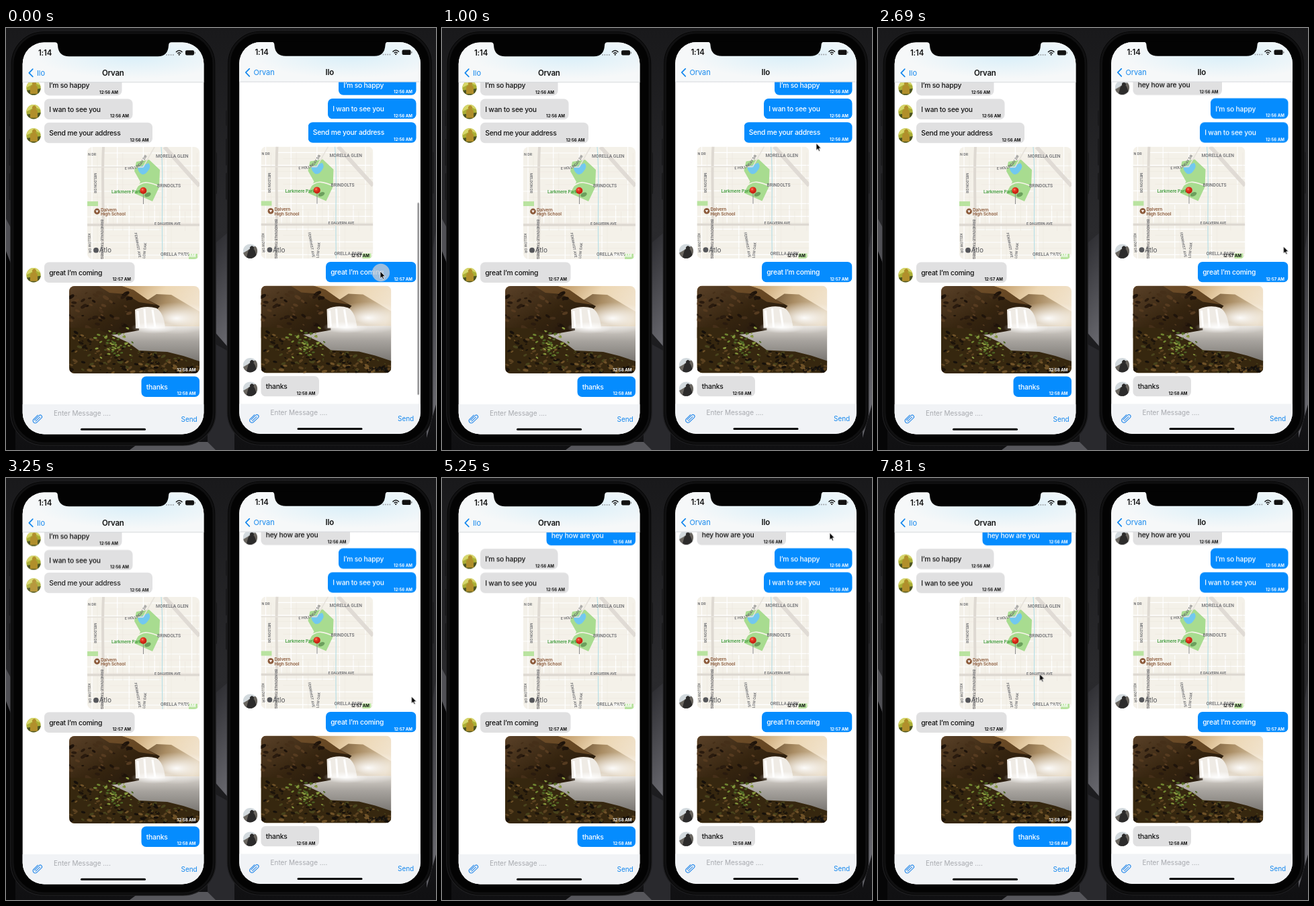
An HTML page that plays this animation: 640x628 px, repeating every 8 s.

```html
<!DOCTYPE html>
<html lang="en">
<head>
<meta charset="utf-8">
<title>Chat</title>
<style>
html, body { margin: 0; width: 100%; height: 100%; overflow: hidden; background: #0c0c0e; }
svg { display: block; width: 100vw; height: 100vh; font-family: Inter, "Open Sans", sans-serif; }
.msg { font-size: 10.3px; font-weight: 500; letter-spacing: -.2px; }
.time { font-size: 6.1px; font-weight: 700; text-anchor: end; }
.title { font-size: 11.4px; font-weight: 600; letter-spacing: -.2px; }
.link { font-size: 11px; fill: #1588ee; letter-spacing: -.1px; }
.hint { font-size: 10px; fill: #a7a9ae; }
.label { font: 500 6.7px Roboto, sans-serif; fill: #6d6e72; }
.road { font: 500 5.4px Roboto, sans-serif; fill: #66676b; }
.place { font: 600 6.6px Inter, sans-serif; letter-spacing: -.15px; }

.cursor, .tap, .bar, .upper, .gone { animation: 8s ease-in-out infinite; }
.cursor { animation-name: cursor; }
.tap { animation-name: tap; }
.bar { animation-name: bar; }
.right .upper { animation-name: drop-right; }
.right .gone { animation-name: swipe; }
.left .upper { animation-name: drop-left; }
.left .gone { animation-name: fade; }

@keyframes cursor {
  0%, 3% { transform: translate(557px, 362px); }
  11.8%, 14.1% { transform: translate(557px, 171.5px); }
  17.5%, 18.2% { transform: translate(508px, 168px); }
  21.6%, 26.8% { transform: translate(576.5px, 161.5px); }
  33.4%, 57% { transform: translate(603.5px, 325px); }
  59.4%, 81.25% { transform: translate(577px, 81.5px); }
  89.9%, 93.75% { transform: translate(268px, 236px); }
  97.4%, 100% { transform: translate(240.5px, 291.5px); }
}
@keyframes tap {
  0%, .75% { opacity: 1; }
  2.3%, 14.1% { opacity: 0; }
  14.8%, 17.6% { opacity: 1; }
  18.4%, 22.7% { opacity: 0; }
  23.3%, 24.3% { opacity: 1; }
  25.2%, 100% { opacity: 0; }
}
@keyframes bar {
  0%, 5% { opacity: 1; }
  9%, 100% { opacity: 0; }
}
@keyframes drop-right {
  0%, 25% { transform: none; }
  29.8%, 100% { transform: translateY(35.3px); }
}
@keyframes drop-left {
  0%, 39.9% { transform: none; }
  45%, 100% { transform: translateY(35.3px); }
}
@keyframes swipe {
  0%, 14.6% { transform: none; opacity: 1; }
  18.6%, 25% { transform: translateX(-49px); opacity: 1; }
  28.5%, 100% { transform: translateX(-120px); opacity: 0; }
}
@keyframes fade {
  0%, 39.9% { opacity: 1; }
  43.5%, 100% { opacity: 0; }
}
</style>
</head>
<body>
<svg id="stage" viewBox="0 0 640 628" preserveAspectRatio="none">
  <defs>
    <linearGradient id="bg" x2="0" y2="1">
      <stop stop-color="#19191b"/><stop offset=".48" stop-color="#2a2a2d"/><stop offset="1" stop-color="#101012"/>
    </linearGradient>
    <linearGradient id="facet" x2=".3" y2="1">
      <stop stop-color="#222226"/><stop offset="1" stop-color="#66666c"/>
    </linearGradient>
    <linearGradient id="sky" x1="0" x2="1" y2=".5">
      <stop offset=".35" stop-color="#c09a67"/><stop offset=".6" stop-color="#ecd6b2"/><stop offset="1" stop-color="#f3e9da"/>
    </linearGradient>
    <linearGradient id="hill" x2="1" y2=".3">
      <stop stop-color="#6e5435"/><stop offset=".4" stop-color="#a98c63"/><stop offset="1" stop-color="#dfcdb0"/>
    </linearGradient>
    <linearGradient id="lake" x2="0" y2="1">
      <stop stop-color="#d9d4cd"/><stop offset=".4" stop-color="#a7a39e"/><stop offset="1" stop-color="#76736f"/>
    </linearGradient>
    <linearGradient id="cliff" x2="1" y2="1">
      <stop stop-color="#5a4128"/><stop offset=".5" stop-color="#35240f"/><stop offset="1" stop-color="#1f150c"/>
    </linearGradient>
    <radialGradient id="mist"><stop stop-color="#fff" stop-opacity=".95"/><stop offset="1" stop-color="#fff" stop-opacity="0"/></radialGradient>
    <radialGradient id="tint" cx=".62" cy=".35" r=".55">
      <stop stop-color="#d9eff9"/><stop offset="1" stop-color="#f6f8f9"/>
    </radialGradient>
    <radialGradient id="ball" cx=".38" cy=".35"><stop stop-color="#ff8a74"/><stop offset=".4" stop-color="#ec3a24"/><stop offset="1" stop-color="#c62313"/></radialGradient>
    <clipPath id="screen"><rect x="24.700" y="21.500" width="269.700" height="583" rx="32"/></clipPath>
    <clipPath id="chat"><rect x="24" y="81" width="271" height="479"/></clipPath>
    <clipPath id="mapBox"><rect x="121" y="177" width="167" height="167" rx="8"/></clipPath>
    <clipPath id="photoBox"><rect width="194" height="130" rx="8"/></clipPath>
    <clipPath id="face"><circle r="10.700"/></clipPath>
    <path id="bend" d="M177 211L190 210Q199 208 204 200L217 180"/>

    <g id="map" clip-path="url(#mapBox)">
      <rect x="121" y="177" width="167" height="167" fill="#f4f1e9"/>
      <g id="streets" stroke="#fff" stroke-width="1.200" fill="none"></g>
      <path d="M121 258h16v7h-16zM272 336h13v8h-13z" fill="#b9e3a0"/>
      <path d="M194 199L213 196L229 211L228 237L218 258L191 246L200 229L191 213Z" fill="#a8dc90"/>
      <path d="M190 240Q201 229 210 230T229 236" stroke="#f6f3e8" stroke-width="1.600" fill="none"/>
      <path d="M196 208Q203 205 212 201Q217 206 211 213Q206 220 201 217Q196 213 196 208Z" fill="#72c8ef"/>
      <path d="M231 177C235 220 231 260 233 344" stroke="#b8dfe6" stroke-width="1.200" fill="none"/>
      <g fill="none" stroke="#ded9d2">
        <path d="M145 177C142 230 147 280 143 344" stroke-width="4"/>
        <path d="M121 293H288" stroke-width="3.500"/>
        <path d="M236 177Q266 211 288 235" stroke-width="6" stroke="#e0dbd5"/>
        <path d="M121 207H204M204 207L221 177" stroke-width="1.600" stroke="#e6e2db"/>
      </g>
      <g class="road">
        <text x="122" y="190">N DR</text>
        <text><textPath href="#bend">E HOLLINGAY DR</textPath></text>
        <text x="221" y="293">E DALVERN AVE</text>
        <text transform="translate(131 216)rotate(90)">MELDON DR</text>
        <text transform="translate(141 285)rotate(90)">BRINDOVALE-TAMOREG</text>
        <text transform="translate(191 305)rotate(80)">FENWHIST AVE</text>
        <text transform="translate(207 343)rotate(-84)">LOW OAK</text>
        <text transform="translate(122 306)rotate(88)">KELLOW DR</text>
      </g>
      <g class="label">
        <text x="223" y="192.500">MORELLA GLEN</text>
        <text x="225" y="236.500">BRINDOLTS</text>
        <text x="230" y="339">ORELLA PARK</text>
      </g>
      <g class="place">
        <text x="157" y="246" fill="#3f9a3a">Larkmere Park</text>
        <g fill="#8c5b3c"><circle cx="135.500" cy="273" r="4.400"/><text x="141" y="272.800">Dalvern</text><text x="141" y="279.300">High School</text></g>
      </g>
      <path d="M133.300 271.500h4.400l-2.200 3.500z" fill="#fff"/>
      <ellipse cx="211" cy="248" rx="5" ry="3" fill="#3d6d34" opacity=".55" transform="rotate(-25 211 248)"/>
      <path d="M204.500 246V262" stroke="#8f8f8f" stroke-width="1.100"/>
      <circle cx="204.300" cy="242" r="5" fill="url(#ball)"/>
      <circle cx="134" cy="330.700" r="3.900" fill="#55565a"/>
      <text x="138.500" y="334.300" font-size="10" fill="#55565a">Atlo</text>
    </g>

    <g id="photo" clip-path="url(#photoBox)">
      <rect width="194" height="130" fill="url(#sky)"/>
      <path d="M112 24L130 12L152 13L194 38V78H112Z" fill="url(#hill)"/>
      <rect y="60" width="194" height="55" fill="url(#lake)"/>
      <ellipse cx="160" cy="48" rx="58" ry="24" fill="url(#mist)"/>
      <path d="M0 0H78L96 6L116 20L135 30L128 38L102 36L104 66L70 72L0 78Z" fill="url(#cliff)"/>
      <path d="M44 0H78L96 6L116 20L130 28L104 24L84 12L60 10Z" fill="#80592f" opacity=".65"/>
      <g id="rock"></g>
      <path d="M98 35Q114 28 130 33Q141 40 143 63H99Z" fill="#efebe5"/>
      <path d="M102 37L104 61M112 34L114 62M124 35L128 61" stroke="#fff" stroke-width="3"/>
      <ellipse cx="126" cy="62" rx="34" ry="9" fill="url(#mist)"/>
      <path d="M0 62L40 63L66 74L88 84L104 96L146 98L170 104L194 112V130H0Z" fill="#36270f"/>
      <g id="moss"></g>
    </g>

    <g id="faceA" clip-path="url(#face)">
      <rect x="-11" y="-11" width="22" height="22" fill="#a9ae35"/>
      <path d="M-11-11H11V-3L2-7L-11 0Z" fill="#d6d66a"/><path d="M-11 4L11 1V11H-11Z" fill="#4d5423"/>
      <path d="M-5 9V0Q-4-4-1-4A3 3 0 1 1 3-4Q6-3 6 1V9Z" fill="#b18f2b"/>
    </g>
    <g id="faceB" clip-path="url(#face)">
      <rect x="-11" y="-11" width="22" height="22" fill="#d3dade"/>
      <path d="M-11 3L-4-1L3-6L11-8V11H-11Z" fill="#6a6660"/>
      <path d="M-6 11L-3 0Q-2-3 0-3A3 3 0 1 1 5-3Q8-1 10 11Z" fill="#2c2b2b"/>
    </g>
    <path id="clip" d="M-4.500 1.500L2.200-5.200A2.500 2.500 0 0 1 5.800-1.600L-1.800 5.600A3.500 3.500 0 0 1-6.300.600L.300-5.800M-2.800 3.200L3.500-2.800" fill="none" stroke="#2a8bea" stroke-width="1.100" stroke-linecap="round"/>
    <path id="trash" d="M-6-4.500H6M-2-4.500V-6.500H2V-4.500M-4.800-4.500L-4 7H4L4.800-4.500M-1.900-2V4.500M0-2V4.500M1.900-2V4.500" fill="none" stroke="#fff" stroke-width=".9" stroke-linejoin="round"/>
  </defs>

  <rect width="640" height="628" fill="url(#bg)"/>
  <path d="M300 330L340 296V486L300 440Z" fill="url(#facet)"/>
  <path d="M300 464L340 486V628H300Z" fill="#29292d"/>
  <path d="M626 380L640 300V560L626 610Z" fill="url(#facet)"/>
  <path d="M0 330L14 370V628H0Z" fill="#060607"/>
  <path d="M0 284L14 310V368L0 332Z" fill="#505055"/>
  <path d="M184 628L200 616H300L312 628Z" fill="#56565b"/>
  <g id="phones"></g>
  <g class="cursor">
    <circle class="tap" cx="1" cy="2" r="13.200" fill="#c3cad6" fill-opacity=".8"/>
    <path d="M0 0V10.600L2.400 8.400L4 12L5.700 11.200L4.100 7.800H7.400Z" fill="#000" stroke="#fff" stroke-width=".8" stroke-linejoin="round"/>
  </g>
</svg>
<script>
const $ = id => document.getElementById(id);
const RIGHT = 288, LEFT = 57, H = 30.5;

let seed = 7;
const rnd = () => (seed = seed * 16807 % 2147483647) / 2147483647;

const text = (x, y, s, cls, fill = '#111') =>
  `<text x="${x}" y="${y}" class="${cls}" fill="${fill}">${s}</text>`;

// top: y of the row's bubble, by: who sent it
const row = (top, by, w, msg, time) => ({ top, by, w, msg, time, h: H });
const upper = [
  row(34.6, 'B', 132.5, 'hey how are you', '12:56 AM'),
  row(69.9, 'A', 115.5, 'I’m so happy', '12:56 AM'),
  row(105.5, 'A', 131.5, 'I wan to see you', '12:56 AM')
];
const gone = row(140.8, 'A', 161, 'Send me your address', '12:56 AM');
const lower = [
  { top: 177, by: 'B', w: 167, h: 167, art: 'map', time: '12:57 AM' },
  row(348.5, 'A', 134.5, 'great I’m coming', '12:57 AM'),
  { top: 384, by: 'B', w: 194, h: 129.7, art: 'photo', time: '12:58 AM' },
  row(518.5, 'B', 86.5, 'thanks', '12:58 AM')
];

function drawRow(r, me) {
  const mine = r.by === me, x = mine ? RIGHT - r.w : LEFT, bottom = r.top + r.h;
  let out = mine ? '' : `<use href="#face${r.by}" x="41" y="${bottom - 11.3}"/>`;
  if (r.art === 'map') out += `<use href="#map" x="${x - 121}"/>`;
  else if (r.art) out += `<use href="#photo" x="${x}" y="${r.top}"/>`;
  else out += `<rect x="${x}" y="${r.top}" width="${r.w}" height="${r.h}" rx="7" fill="${mine ? '#058cfe' : '#e0e0e1'}"/>`
    + text(x + 7.2, r.top + 19.3, r.msg, 'msg', mine ? '#fff' : '#111');
  return out + text(x + r.w - 5.5, bottom - 2.8, r.time, 'time', mine ? '#fff' : '#111');
}

function header(back, title) {
  return `<rect x="24" y="21" width="271" height="60" fill="url(#tint)"/>
    <path d="M24 80.700H295" stroke="#c9cccf" stroke-width=".7"/>
    ${text(48, 41, '1:14', 'title')}
    <g fill="#9fa3a8">${[0, 1, 2, 3].map(i => `<circle cx="${239 + i * 3.3}" cy="40" r="1"/>`).join('')}</g>
    <path d="M253 36Q257.700 31 262.400 36M255.200 38Q257.700 35.300 260.200 38" fill="none" stroke="#111" stroke-width="1.500"/>
    <circle cx="257.700" cy="39.700" r="1.100" fill="#111"/>
    <rect x="267" y="33.200" width="13" height="7.300" rx="2" fill="#111"/><rect x="280.700" y="35.500" width="1.200" height="2.800" rx=".6" fill="#777"/>
    <path d="M39.800 61.200L34.300 66.800L39.800 72.400" fill="none" stroke="#1588ee" stroke-width="1.700" stroke-linecap="round" stroke-linejoin="round"/>
    <text x="46" y="70.500" class="link">${back}</text>
    <text x="159.300" y="70.500" class="title" fill="#111" text-anchor="middle">${title}</text>`;
}

const footer = `<rect x="24" y="560" width="271" height="45" fill="#f1f3f6"/>
  <use href="#clip" x="47" y="582"/>
  <text x="71" y="577" class="hint">Enter Message ....</text>
  <text x="284.500" y="586" class="link" style="font-size:10px" text-anchor="end">Send</text>
  <rect x="111" y="595.700" width="97" height="3" rx="1.500" fill="#000"/>`;

const body = `<g fill="#18181a">
    <rect x="4.500" y="123" width="4" height="23" rx="1.500"/><rect x="4.500" y="165" width="4" height="40" rx="1.500"/>
    <rect x="4.500" y="216" width="4" height="40" rx="1.500"/><rect x="310" y="185" width="4" height="62" rx="1.500"/>
  </g>
  <rect x="7" y="4.500" width="305" height="616.500" rx="49" fill="#030303" stroke="#1c1c1e" stroke-width="1.500"/>
  <rect x="10" y="7.500" width="299" height="610.500" rx="46" fill="none" stroke="#101011" stroke-width="3"/>`;

const notch = `<path d="M73 21Q77 21.500 77 26Q78 42.300 94 42.300H226Q241 42.300 242 26Q242 21.500 246 21Z" fill="#030303"/>`;

function phone(side, me, back, title) {
  const rows = list => list.map(r => drawRow(r, me)).join('');
  const isRight = side === 'right';
  return `<g class="${side}" transform="translate(${isRight ? '322.500 -.6' : '0 0'})">${body}
    <g clip-path="url(#screen)">
      <rect x="24" y="21" width="271" height="584" fill="#fff"/>
      <g clip-path="url(#chat)">
        <g class="gone">${drawRow(gone, me)}${isRight
          ? '<rect x="295" y="138.800" width="130" height="35.300" fill="#f4432f"/><use href="#trash" x="319" y="156"/>' : ''}</g>
        <g class="upper">${rows(upper)}</g>
        ${rows(lower)}
        ${isRight ? '<rect class="bar" x="290" y="260.500" width="2.500" height="286" rx="1.250" fill="#8c8c8e"/>' : ''}
      </g>
      ${header(back, title)}${footer}
    </g>${notch}</g>`;
}

let lanes = '';
for (let i = 0; i < 9; i++) {
  const x = 128 + i * 18 + rnd() * 6, y = 186 + i * 19;
  lanes += `M${x} ${i % 2 ? 264 : 177}V${i % 3 ? 293 : 344}M${i % 2 ? 121 : 146} ${y}H${i % 3 ? 288 : 231}`;
}
$('streets').innerHTML = `<path d="${lanes}"/><path d="${lanes}" transform="translate(8 9)" stroke="#ece8e0" stroke-width=".6"/>`;

// scatter n leaning blobs, at(i) gives x, y, radius
function scatter(n, fills, at) {
  let out = '';
  for (let i = 0; i < n; i++) {
    const [x, y, r] = at(i);
    out += `<ellipse rx="${r}" ry="${r * .5}" fill="${fills[i % fills.length]}" transform="translate(${x} ${y})rotate(${rnd() * 80 - 40})"/>`;
  }
  return out;
}
const bank = x => 66 + Math.min(x * .3, 34) + Math.max(0, x - 150) * .3;

$('rock').innerHTML = scatter(60, ['#1e130a', '#563b20', '#2a1b0e', '#452f19'],
  () => [rnd() * 92, 10 + rnd() * 54, 1.5 + rnd() * 4]);
$('moss').innerHTML =
  scatter(170, ['#5b4220', '#1d140a', '#6f5228', '#48431c', '#16100a'], () => {
    const x = rnd() * 194, top = bank(x);
    return [x, top + rnd() * (129 - top), 1.2 + rnd() * 3];
  }) +
  scatter(60, ['#6f8430', '#8a9a3e', '#4d6524'],
    () => [66 + (rnd() + rnd() - 1) * 34, 86 + (rnd() + rnd() - 1) * 28, 1 + rnd() * 2]);

$('phones').innerHTML = phone('left', 'B', 'Ilo', 'Orvan') + phone('right', 'A', 'Orvan', 'Ilo');
</script>
</body>
</html>
```
